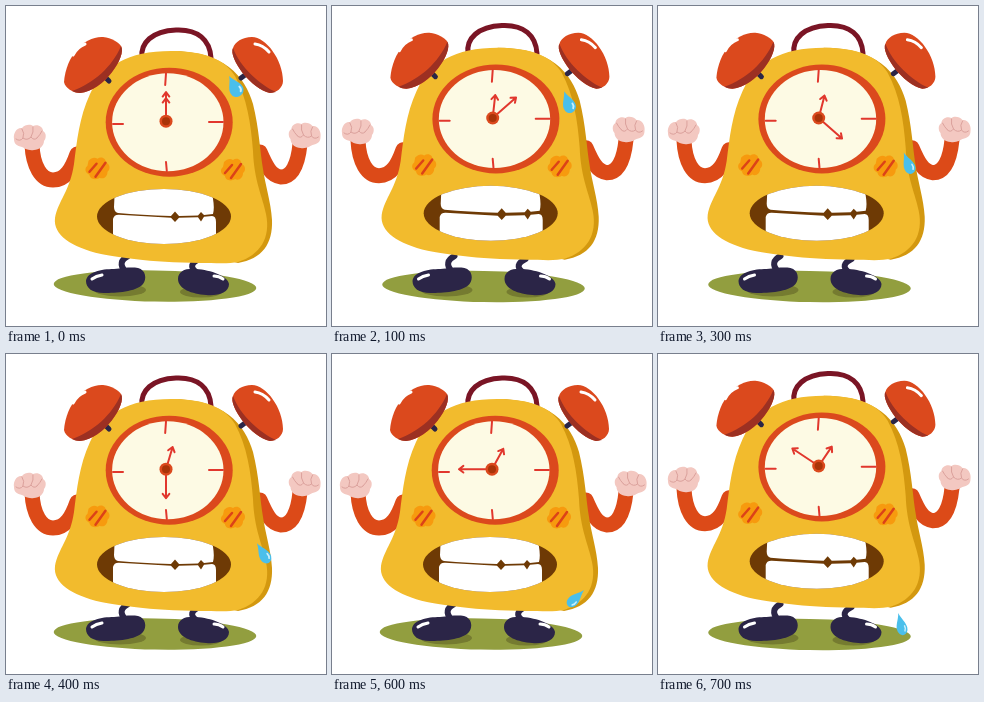
An HTML page that plays this animation: 320 by 320 pixels, repeating every 800 ms.

```html
<!DOCTYPE html>
<html lang="en">
<head>
<meta charset="utf-8">
<title>Nervous alarm clock</title>
<style>
  html, body { margin: 0; width: 100%; height: 100%; overflow: hidden; background: #fff; }
  svg { display: block; width: 100vw; height: 100vh; }
  .line { fill: none; stroke-linecap: round; stroke-linejoin: round; }
  .red { fill: #db491d; }
  .navy { fill: #2b2547; }
  .arm { stroke: #dc4a18; stroke-width: 15; }
  .leg { stroke: #2b2547; stroke-width: 6; }
  .shine { stroke: #fff; stroke-width: 3; }
  .mark { stroke: #e1372d; stroke-width: 2; }
  .slash { stroke: #dc4218; stroke-width: 2.5; }
  .knuckle { stroke: #dba19c; stroke-width: 1; }
</style>
</head>
<body>
<svg viewBox="0 0 320 320">
  <defs>
    <clipPath id="mouth"><ellipse cx="158" cy="210.5" rx="67" ry="27.5"/></clipPath>
    <g id="fist">
      <path fill="#f3c8c1" d="M-16 2C-17-4-13-10-8-9C-5-13 1-13 3-11C8-13 13-10 13-6C17-4 16 2 14 4C14 9 9 13 4 13C-2 14-6 11-8 10C-13 9-16 7-16 2Z"/>
      <path class="line knuckle" d="M-8-8Q-5-4-7 1M3-10Q4-5 1 0M12-6Q10-2 7 1M-14 2Q-10 5-7 1Q-3 4 1 0Q4 4 7 1"/>
    </g>
    <g id="cheek">
      <path fill="#f79a0e" d="M-9-8C-6-11-3-12 0-10C4-13 9-10 8-6C13-5 13 1 10 3C10 8 6 11 2 9C-2 12-8 10-8 6C-13 4-13-1-10-3Z"/>
      <path class="line slash" d="M-8 3L-1-5M-2 8L8-6"/>
    </g>
  </defs>

  <ellipse id="ground" rx="101.3" ry="15.6" fill="#929e3f"/>
  <g id="legs">
    <g fill="#757b30">
      <ellipse cx="114" cy="284" rx="26" ry="6.5"/>
      <ellipse cx="195" cy="286" rx="21" ry="5.5"/>
    </g>
    <path class="line leg" d="M122 250Q111 256 119 265M193 253Q181 259 190 266"/>
    <path class="navy" d="M80 275C81 266 95 263 108 263C118 262 125 261 132 262C140 264 141 273 137 278C130 286 110 287 98 287C86 287 80 282 80 275Z"/>
    <path class="navy" d="M172 273C172 265 180 262 190 263C205 264 222 270 223 278C223 287 212 290 200 289C186 288 172 283 172 273Z"/>
    <path class="line shine" stroke-width="2" d="M86 273Q90 270 96 269M208 270Q213 270 217 273"/>
  </g>

  <g id="arms" class="line arm">
    <path d="M26 139C27 160 35 174 47 174C60 174 66 162 71 148"/>
    <path d="M294 138C292 158 286 171 275 171C265 170 260 160 254 146"/>
  </g>
  <path id="handle" class="line" stroke="#7a1525" stroke-width="5" d="M136 52C134 37 146 25 170 24C192 23 204 34 205 52"/>

  <g id="body">
    <path fill="#d3980f" d="M165 45C218 45 239 70 247 98C253 122 254 145 257 163C259 178 265 196 266 214C267 238 256 253 232 257L165 240Z"/>
    <path fill="#f2bb2d" d="M165 45C200 45 219 54 229 70C241 92 245 118 247 145C248 175 257 192 260 208C265 232 254 249 232 256Q222 258 205 257C150 257 115 252 95 248C65 241 47 229 49 212C52 195 64 185 68 158C71 135 73 112 84 88C97 60 122 45 165 45Z"/>
    <ellipse cx="163.2" cy="116.2" rx="63.5" ry="54.5" class="red"/>
    <ellipse cx="161.8" cy="116.3" rx="55.7" ry="49" fill="#fdfae4"/>
    <path class="line mark" d="M160 67.5L159.2 79M203 116H217M160 156L160.8 165M107 118H117"/>
    <path id="hands" class="line mark"/>
    <circle cx="160" cy="115.2" r="6.5" class="red"/>
    <circle cx="160" cy="115.2" r="4" fill="#a93409"/>
    <use href="#cheek" x="91.5" y="162.7"/>
    <use href="#cheek" x="227" y="164"/>
    <g clip-path="url(#mouth)">
      <path fill="#6e3a05" d="M90 182H226V240H90Z"/>
      <path fill="#fff" d="M109 180H204C207 190 209 201 207 208L198 209L195 206L192 209.5L173 210L169 205.5L165 210Q135 209 112 207Q108 206 108 201Z"/>
      <path id="lower" fill="#fff" d="M107 213Q108 208.5 113 208.7L165 211.7L169 216L173 211.7L192 211.2L195 215.5L198 210.7L206 210Q210 210 210 216V240H107Z"/>
    </g>
  </g>

  <g id="bells">
    <path class="line" stroke="#2b2547" stroke-width="5" d="M95 67L103 75M243 66L235 72"/>
    <path class="red" d="M115 40C121 50 98 85 74 87C67 87 59 82 58 76C60 50 78 30 97 31C106 32 112 36 115 40Z"/>
    <path class="red" d="M227 42C222 52 246 84 264 87C270 87 277 82 277 75C277 54 260 31 246 31C236 31 229 36 227 42Z"/>
    <path fill="#9c3022" d="M115 40C121 50 98 85 74 87Q70 87 66 85C88 77 106 61 115 40ZM227 42C222 52 246 84 264 87L270 86C254 79 234 61 227 42Z"/>
    <path class="line shine" d="M67 49Q71 41 79 38M249 38Q257 39 263 46"/>
  </g>
  <use id="left" href="#fist"/>
  <use id="right" href="#fist"/>

  <g id="drop">
    <path fill="#4abfeb" d="M0-12C2-5 7-1 7 5A7 7 0 0 1-7 5C-7-1-2-5 0-12Z"/>
    <path class="line" stroke="#c9effc" stroke-width="2" d="M3 8Q5 6 4 3"/>
  </g>
</svg>
<script>
const $ = id => document.getElementById(id);
const move = (id, x, y, rest = "") => $(id).setAttribute("transform", `translate(${x} ${y}) ${rest}`);

const minutes = [0, 45, 90, 135, 180, 222, 270, 307];
const hours = [0, 6, 12, 14, 16, 22, 28, 33];
// x, y, tilt, width scale
const drops = [
  [228.5, 80, -28, 1], [236, 96, -20, .9], [243, 116, -15, .8], [250, 157, -22, .8],
  [257, 199, -32, .8], [260.5, 213, 5, .9], [244, 244, 45, .75], [243, 270, -14, .75]
];

// Arrow from the dial centre; the dial is a little flattened.
function arrow(angle, length, squash) {
  const a = angle * Math.PI / 180;
  const cx = 160, cy = 115.2;
  const x = cx + Math.sin(a) * length;
  const y = cy - Math.cos(a) * length * squash;
  const dir = Math.atan2(y - cy, x - cx);
  const barb = turn => `${x - 5.5 * Math.cos(dir + turn)} ${y - 5.5 * Math.sin(dir + turn)}`;
  return `M${cx} ${cy}L${x} ${y}M${barb(.65)}L${x} ${y}L${barb(-.65)}`;
}

const start = performance.now();

function draw() {
  const time = performance.now() - start;
  const step = Math.floor(time % 800 / 100);
  const up = step % 2;
  move("ground", 149 + up * 2.5, 280 + up * .5, "rotate(1.2)");
  move("legs", up * .5, 0);
  move("arms", 0, up * -4.3);
  move("handle", 0, up * -4.5);
  move("body", up * .7, up * -3.2);
  move("lower", 0, up * 1.2);
  move("bells", up * .4, up * -4.3);
  move("left", 24 + up * 2, 131 - up * 6);
  move("right", 298.5 - up * 2, 129 - up * 6, "scale(-1 1)");
  $("hands").setAttribute("d", arrow(minutes[step], 33, .88) + arrow(hours[step], 24, .96));
  const [x, y, tilt, width] = drops[step];
  move("drop", x, y, `rotate(${tilt}) scale(${width} .95)`);
  requestAnimationFrame(draw);
}
draw();
</script>
</body>
</html>
```
